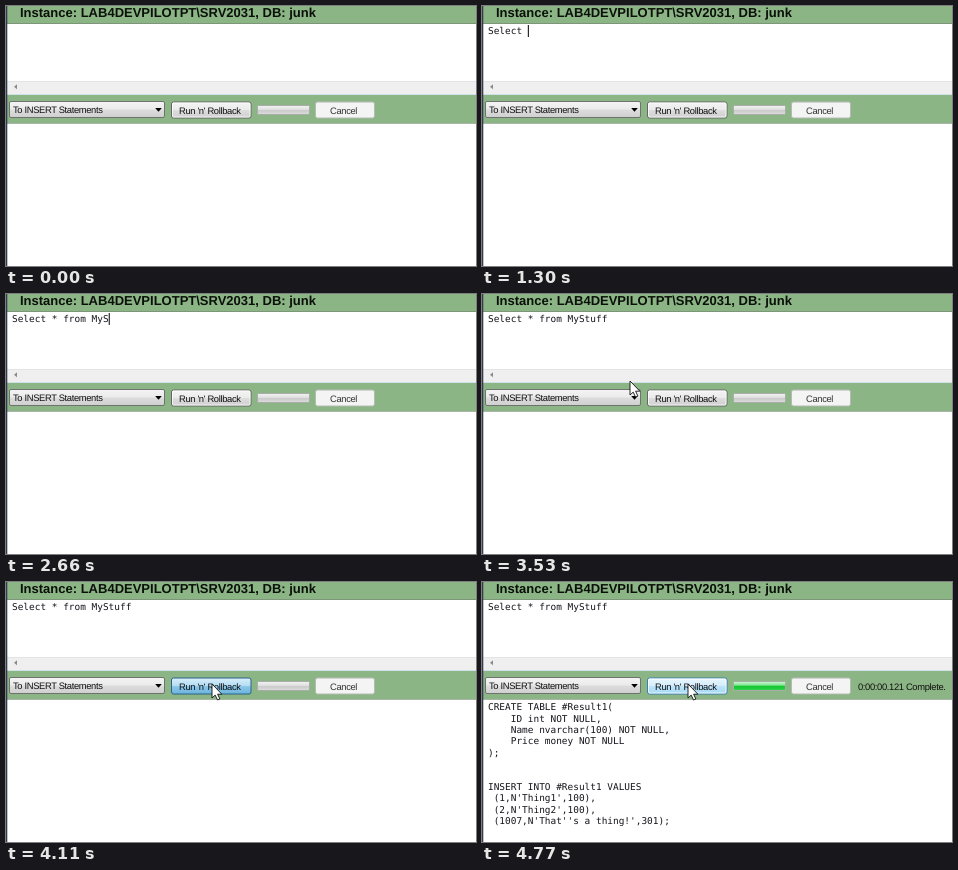
Animation of 470 by 260 pixels, one loop 6.87 s. Source, as an HTML page:

```html
<!DOCTYPE html>
<html lang="en">
<head>
<meta charset="utf-8">
<title>Query to INSERT statements</title>
<style>
html, body { margin: 0; width: 100%; height: 100%; overflow: hidden; background: #fff; }
svg { display: block; width: 470px; height: 260px; }
text { white-space: pre; text-rendering: geometricPrecision; }
.title { font: bold 13px "Liberation Sans", Arial, sans-serif; fill: #0b100a; }
.ui { font: 9.4px "Liberation Sans", Arial, sans-serif; letter-spacing: -.35px; fill: #111; }
.code { font: 9.45px "DejaVu Sans Mono", monospace; fill: #14141c; }
</style>
</head>
<body>
<svg viewBox="0 0 470 260">
  <defs>
    <linearGradient id="plain" x2="0" y2="1">
      <stop offset="0" stop-color="#f4f4f4"/><stop offset=".48" stop-color="#ebebeb"/>
      <stop offset=".52" stop-color="#dddddd"/><stop offset="1" stop-color="#cfcfcf"/>
    </linearGradient>
    <linearGradient id="hover" x2="0" y2="1">
      <stop offset="0" stop-color="#eaf6fd"/><stop offset=".48" stop-color="#d5eefb"/>
      <stop offset=".52" stop-color="#bce5fb"/><stop offset="1" stop-color="#a6d9f4"/>
    </linearGradient>
    <linearGradient id="press" x2="0" y2="1">
      <stop offset="0" stop-color="#d9eefa"/><stop offset=".48" stop-color="#b5ddf4"/>
      <stop offset=".52" stop-color="#8cc8ea"/><stop offset="1" stop-color="#6bb3dc"/>
    </linearGradient>
    <linearGradient id="track" x2="0" y2="1">
      <stop offset="0" stop-color="#f3f3f3"/><stop offset=".45" stop-color="#e0e0e0"/>
      <stop offset=".55" stop-color="#cbcbcb"/><stop offset="1" stop-color="#dcdcdc"/>
    </linearGradient>
    <linearGradient id="green" x2="0" y2="1">
      <stop offset="0" stop-color="#c5f3cd"/><stop offset=".42" stop-color="#7be38c"/>
      <stop offset=".5" stop-color="#12c42f"/><stop offset="1" stop-color="#2fd34a"/>
    </linearGradient>
  </defs>

  <rect width="470" height="260" fill="#fff"/>
  <rect width="470" height="17" fill="#8cb585"/>
  <rect y="17" width="470" height="1" fill="#7d9679"/>
  <rect y="75" width="470" height="13" fill="#efefef"/>
  <rect y="75" width="470" height="1" fill="#e4e4e4"/>
  <path d="M11 78.3v5l-3-2.5z" fill="#8a8a8a"/>
  <rect y="88" width="470" height="1" fill="#cfe0e6"/>
  <rect y="89" width="470" height="28" fill="#8cb585"/>
  <rect y="117" width="470" height="1" fill="#a9b5a8"/>
  <rect width="1.3" height="260" fill="#343b50"/>
  <text class="title" x="14" y="11">Instance: LAB4DEVPILOTPT\SRV2031, DB: junk</text>

  <rect x="3.5" y="95.5" width="155" height="16" rx="1.5" fill="url(#plain)" stroke="#6f736f"/>
  <path d="M149.2 102h6.6l-3.3 3.8z"/>
  <text class="ui" x="7" y="107.3">To INSERT Statements</text>

  <rect id="run" x="165.5" y="96" width="79.5" height="16" rx="2" stroke="#666"/>
  <rect id="glow" x="166.5" y="97" width="77.5" height="14" rx="1.2" fill="none" stroke="#fff" stroke-opacity=".75"/>
  <text class="ui" x="173" y="107.7">Run 'n' Rollback</text>

  <rect x="251.5" y="99.5" width="52" height="9" rx="1.2" fill="url(#track)" stroke="#a9ada9"/>
  <rect id="bar" x="252" y="100" width="0" height="8" fill="url(#green)"/>

  <rect x="309.5" y="96" width="59" height="16" rx="2" fill="#f3f4f3" stroke="#b4bbb3"/>
  <text class="ui" x="324" y="107.7" style="fill:#333">Cancel</text>

  <text class="code" id="query" x="6" y="28"></text>
  <rect id="caret" y="19" width="1" height="12"/>
  <g id="done">
    <text class="ui" x="376" y="107.7">0:00:00.121 Complete.</text>
    <g id="result"></g>
  </g>
  <path id="beam" d="M-2 -6.5h4M0 -6.5v13M-2 6.5h4" stroke="#222" fill="none"/>
  <path id="arrow" d="M0 0V14L3.2 11.1 5.5 16 7.9 15 5.6 10.2H9.9Z" fill="#fff" stroke="#111" stroke-width=".9"/>
</svg>
<script>
const LOOP = 6870, CHAR = 5.69;
const QUERY = "Select * from MyStuff";
const RESULT = `CREATE TABLE #Result1(
    ID int NOT NULL,
    Name nvarchar(100) NOT NULL,
    Price money NOT NULL
);


INSERT INTO #Result1 VALUES
 (1,N'Thing1',100),
 (2,N'Thing2',100),
 (1007,N'That''s a thing!',301);`;
// One time per typed character
const KEYS = [490, 650, 850, 880, 1040, 1240, 1300, 1660, 1790, 2020, 2150,
  2210, 2270, 2330, 2400, 2560, 2660, 2820, 2890, 2970, 3050];
// Pointer path: time, x, y
const PATH = [[3350, 128, 46], [3530, 148, 87], [3650, 180, 98], [3920, 206, 102]];

const el = id => document.getElementById(id);
const show = (id, on) => el(id).setAttribute("visibility", on ? "visible" : "hidden");
const clamp = v => Math.max(0, Math.min(1, v));
const step = (t, start, size) => start + Math.floor((t - start) / size) * size;

RESULT.split("\n").forEach((line, i) => {
  const text = document.createElementNS("http://www.w3.org/2000/svg", "text");
  text.setAttribute("class", "code");
  text.setAttribute("x", 6);
  text.setAttribute("y", 128.3 + i * 11.36);
  text.textContent = line;
  el("result").append(text);
});

function pointer(t) {
  const s = step(t, PATH[0][0], 30);
  let i = 0;
  while (i < PATH.length - 2 && s >= PATH[i + 1][0]) i++;
  const [t0, x0, y0] = PATH[i], [t1, x1, y1] = PATH[i + 1];
  const k = clamp((s - t0) / (t1 - t0));
  return [x0 + (x1 - x0) * k, y0 + (y1 - y0) * k];
}

function draw(t) {
  const typed = KEYS.filter(k => t >= k).length;
  el("query").textContent = QUERY.slice(0, typed);
  el("caret").setAttribute("x", 6 + CHAR * typed);
  show("caret", t >= 190 && t < 3350);

  const [x, y] = pointer(t);
  const moving = t >= 3350, inEditor = y < 76;
  for (const id of ["beam", "arrow"]) el(id).setAttribute("transform", `translate(${x} ${y})`);
  show("beam", moving && inEditor);
  show("arrow", moving && !inEditor);

  const over = moving && x > 165 && y > 96;
  const pressed = t >= 4050 && t < 4170;
  el("run").setAttribute("fill", `url(#${pressed ? "press" : over ? "hover" : "plain"})`);
  el("run").setAttribute("stroke", pressed ? "#2c628b" : over ? "#3c7fb1" : "#666");
  show("glow", !pressed);

  show("done", t >= 4410);
  el("bar").setAttribute("width", 51 * clamp((step(t, 4470, 60) - 4470) / 300));
}

const start = performance.now();
function tick() {
  draw((performance.now() - start) % LOOP);
  requestAnimationFrame(tick);
}
tick();
</script>
</body>
</html>
```
